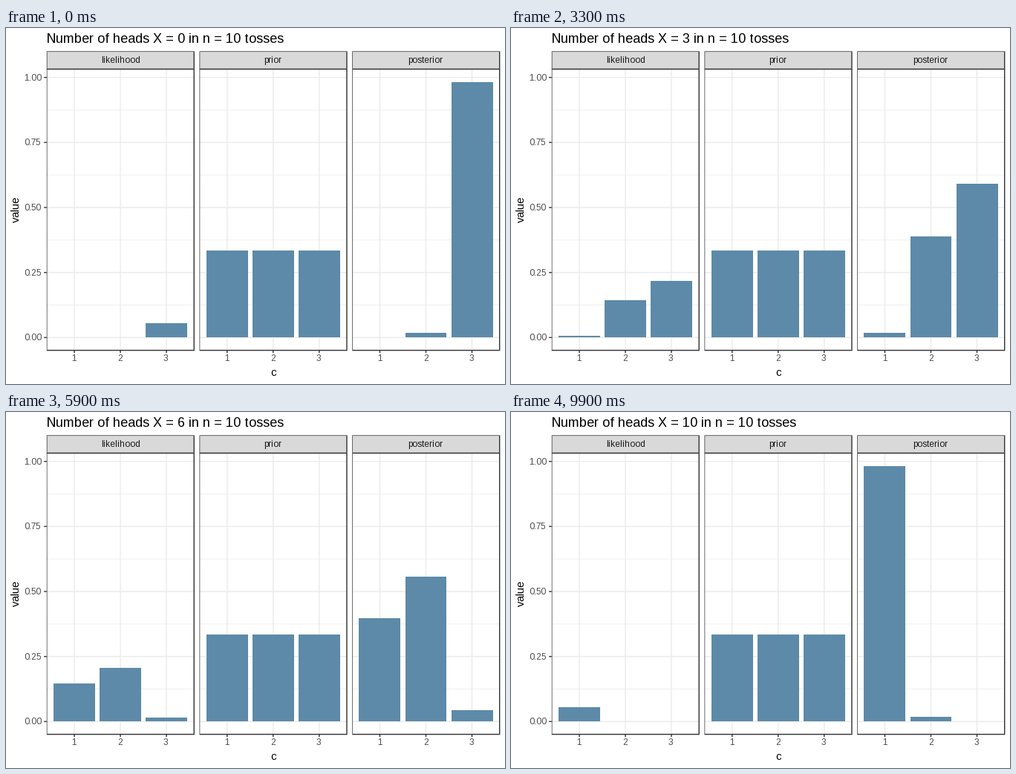
Animation, 672 px wide and 480 px high, one loop 10000 ms. Source, as a matplotlib script:

```python
from math import comb

import matplotlib.pyplot as plt
from matplotlib.animation import FuncAnimation
from matplotlib.patches import Rectangle

plt.rcParams.update({
    "font.family": "Liberation Sans",
    "text.hinting_factor": 1,
    "toolbar": "None",
})

W, H, DPI = 672, 480, 96
FRAMES, INTERVAL = 100, 100
TOSSES = 10
HEADS_PROB = (0.75, 0.5, 0.25)

# Panel geometry in pixels, y pointing down
LEFT, PANEL_W, GAP = 54.8, 198.43, 7.306
STRIP_TOP, TOP, BOTTOM = 31.4, 55.4, 434.58
ZERO, SCALE = 417.35, 350.7
UNIT = PANEL_W / 3.2
HALF = 0.71          # half of a normal line width
TICK = 3.65

BAR, GRID, LINE, STRIP = "#5d8aa8", "#ebebeb", "#333333", "#d9d9d9"
TICK_TEXT, STRIP_TEXT = "#4d4d4d", "#1a1a1a"

# name, x of its label, x of the first tick label, bar edges
PANELS = (
    ("likelihood", 128, 88, ((64, 120), (126, 182), (188, 244))),
    ("prior", 347, 294, ((270, 326), (332, 388), (394, 450))),
    ("posterior", 541, 500, ((475, 531), (538, 593), (600, 656))),
)

fig = plt.figure(figsize=(W / DPI, H / DPI), dpi=DPI, facecolor="white")
ax = fig.add_axes([0, 0, 1, 1])
ax.set(xlim=(0, W), ylim=(H, 0))
ax.axis("off")


def box(x0, y0, x1, y1, color, z):
    return ax.add_patch(Rectangle((x0, y0), x1 - x0, y1 - y0, fc=color,
                                  lw=0, snap=False, zorder=z))


def label(x, y, s, size, color="black", **kw):
    return ax.text(x, y, s, size=size, color=color, ha="left",
                   va="baseline", zorder=6, **kw)


def border(x0, y0, x1, y1, z):
    """Frame whose left and top strokes are clipped to their inner half."""
    box(x0, y0, x1 + HALF, y0 + HALF, LINE, z)
    box(x0, y1 - HALF, x1 + HALF, y1 + HALF, LINE, z)
    box(x0, y0 + HALF, x0 + HALF, y1 - HALF, LINE, z)
    box(x1 - HALF, y0 + HALF, x1 + HALF, y1 - HALF, LINE, z)


def y_of(value):
    return ZERO - SCALE * value


def draw_panel(index):
    name, name_x, tick_x, edges = PANELS[index]
    x0 = LEFT + index * (PANEL_W + GAP)
    x1 = x0 + PANEL_W
    for i in range(9):
        y, half = y_of(i / 8), HALF / (1 + i % 2)
        box(x0, y - half, x1, y + half, GRID, 1)
    for c in range(3):
        x = x0 + (0.6 + c) * UNIT
        box(x - HALF, TOP, x + HALF, BOTTOM, GRID, 1)
        box(x - HALF, BOTTOM, x + HALF, BOTTOM + TICK, LINE, 3)
        label(tick_x + round(c * UNIT), 449, str(c + 1), 8.8, TICK_TEXT)
    border(x0, TOP, x1, BOTTOM, 3)
    box(x0, STRIP_TOP, x1, TOP, STRIP, 4)
    border(x0, STRIP_TOP, x1, TOP, 5)
    label(name_x, 47, name, 8.8, STRIP_TEXT)
    return [ax.add_patch(Rectangle((a, round(ZERO)), b - a, 0, fc=BAR, lw=0,
                                   antialiased=False, zorder=2))
            for a, b in edges]


bars = [bar for i in range(3) for bar in draw_panel(i)]

for i in range(5):
    y = y_of(i / 4)
    box(LEFT - TICK, y - HALF, LEFT, y + HALF, LINE, 3)
    label(24, round(y + 4), f"{i / 4:.2f}", 8.8, TICK_TEXT)

title = label(55, 20, "", 13.2)
label(356, 469, "c", 11)
label(18, 262, "value", 11, rotation=90, rotation_mode="anchor")


def values(heads):
    """Likelihood, prior and posterior of the three coins."""
    like = [comb(TOSSES, heads) * p**heads * (1 - p)**(TOSSES - heads)
            for p in HEADS_PROB]
    return like + [1 / 3] * 3 + [v / sum(like) for v in like]


STATES = [values(k) for k in range(TOSSES + 1)]
KEYS = [round(1 + (FRAMES - 1) * k / TOSSES) - 1 for k in range(TOSSES + 1)]


def update(frame):
    k = max(i for i in range(TOSSES) if KEYS[i] <= frame)
    t = (frame - KEYS[k]) / (KEYS[k + 1] - KEYS[k])
    base = round(ZERO)
    for bar, a, b in zip(bars, STATES[k], STATES[k + 1]):
        top = round(y_of(a + (b - a) * t))
        bar.set_y(top)
        bar.set_height(base - top)
        bar.set_visible(top < base)
    heads = round(frame * TOSSES / (FRAMES - 1))
    title.set_text(f"Number of heads X = {heads} in n = {TOSSES} tosses")
    return [*bars, title]


anim = FuncAnimation(fig, update, frames=FRAMES, interval=INTERVAL,
                     repeat=True, repeat_delay=0, blit=False)
plt.show()
```
